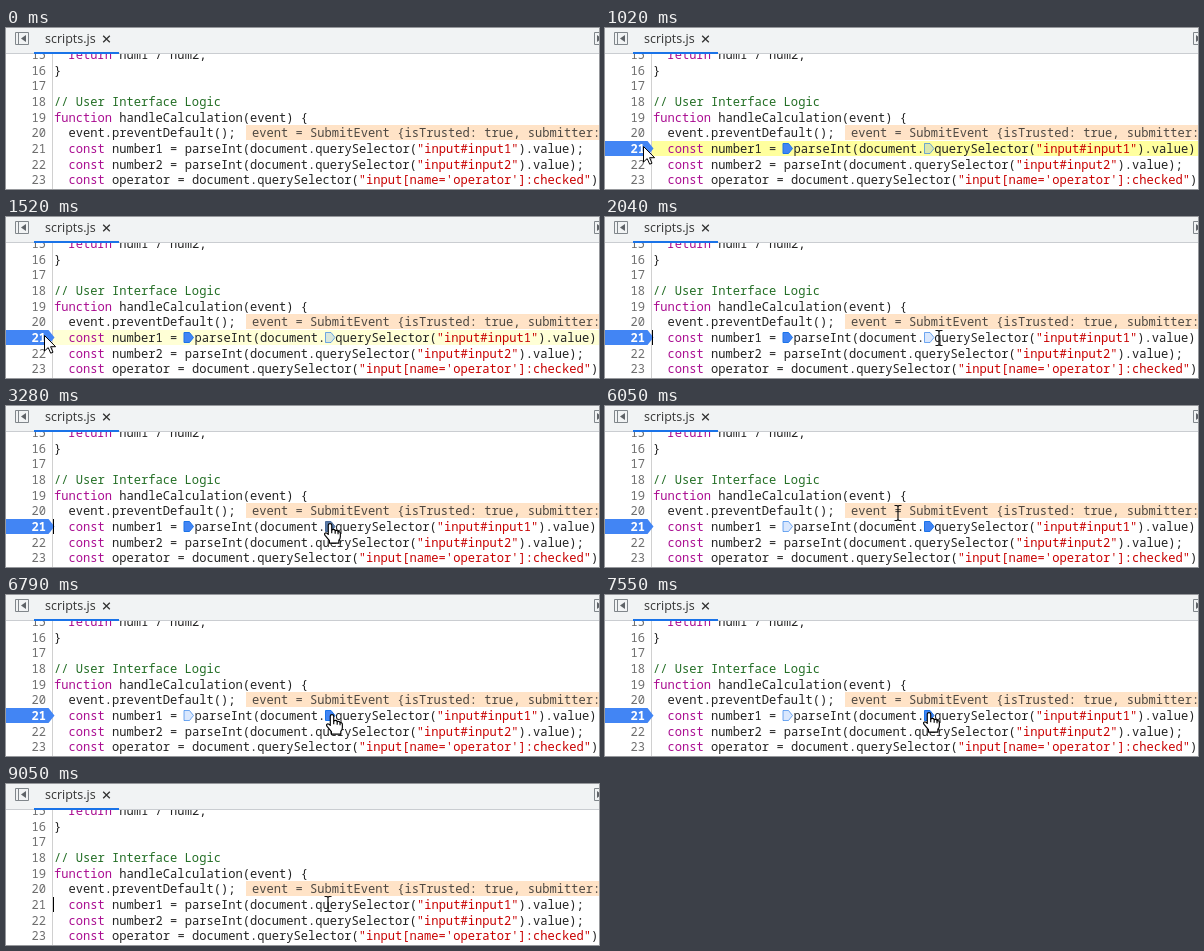
Write an HTML page that moves like this. It is 593 px wide and 161 px high and loops after 9.3 s.

```html
<!DOCTYPE html>
<html lang="en">
<head>
<meta charset="utf-8">
<title>Column breakpoints</title>
<style>
  html, body { margin: 0; width: 100%; height: 100%; overflow: hidden; background: #fff; }
  svg { display: block; width: 593px; height: 161px; }
  text { white-space: pre; }
  .code text { font: 12.1px "Noto Sans Mono", "DejaVu Sans Mono", monospace; fill: #222; }
  .code .keyword { fill: #aa0d91; }
  .code .string { fill: #c80000; }
  .code .comment { fill: #236e25; }
  .code .num { fill: #6e6e6e; text-anchor: end; }
  .code .num.on { fill: #fff; font-weight: 600; }
  .code .value { fill: #4d4842; }
  .tab { font: 12.5px "Open Sans", "Noto Sans", sans-serif; fill: #333; }
  .mark { stroke: #1a73e8; fill: #4285f4; }
  .mark.light { fill: #4285f433; stroke: #1a73e899; }
  .mark.hover { fill: #5b7ba8; stroke: #4a6a98; }
  .icon { fill: none; stroke: #80868b; }
  .icon .solid { fill: #5f6368; stroke: none; }
  .hand, .arrow { fill: #fff; stroke: #000; stroke-linejoin: round; }
  .off { display: none; }
</style>
</head>
<body>
<svg viewBox="0 0 593 161">
  <rect width="593" height="161" fill="#fff"/>
  <rect x="46" width="1" height="161" fill="#d0d0d0"/>
  <rect id="flash" x="47" y="113" width="546" height="15"/>
  <rect x="240" y="97" width="353" height="15" fill="#ffe3c7"/>
  <path id="gutter" d="M0 113H42.5L48.5 120.5L42.5 128H0Z" fill="#4285f4"/>
  <g class="code" id="code"></g>
  <path class="mark" id="m1"/>
  <path class="mark" id="m2"/>
  <rect id="caret" x="47" y="113" width="1" height="15" fill="#000"/>

  <rect width="593" height="25" fill="#f1f3f4"/>
  <rect y="25" width="593" height="1" fill="#cacdd1"/>
  <rect x="28" y="24" width="85" height="2" fill="#1a73e8"/>
  <g class="icon">
    <path d="M9.5 4.5H22.5V16.5H9.5ZM12.5 4.5V16.5"/>
    <path class="solid" d="M20 7V14L15 10.5Z"/>
    <path d="M600 4.5H588.5V16.5H600"/>
    <path class="solid" d="M591 7V14L596 10.5Z"/>
  </g>
  <text class="tab" x="39" y="15">scripts.js</text>
  <path d="M97.2 7.7L103.8 14.3M103.8 7.7L97.2 14.3" stroke="#333" stroke-width="1.3"/>

  <g id="pointer">
    <path class="arrow" id="arrow" d="M.5 .5V16L4.2 12.6L6.7 18.2L9 17.2L6.6 11.7H11.6Z"/>
    <path id="beam" d="M-3.5 -7.5H-1L0 -6.5L1 -7.5H3.5M0 -6.5V6.5M-3.5 7.5H-1L0 6.5L1 7.5H3.5" fill="none" stroke="#111" stroke-width="1.2"/>
    <g class="hand" id="hand" transform="scale(1.15)">
      <path d="M-1.5 10V1.8Q-1.5 .5 0 .5T1.5 1.8V6Q3.8 5 4.5 6.6Q6.6 6 7 7.6Q9 7.2 9 9V12Q9 14 7.7 15V17.5H-.5V15.4L-4.3 10.8Q-5.3 9.2 -4 8.7Q-2.8 8.4 -1.5 10Z"/>
      <path d="M1.5 6V9M4.5 6.6V9.4M7 7.6V9.8" fill="none"/>
    </g>
  </g>
</svg>
<script>
const LOOP = 9300, COL = 7.26, LEFT = 48, PITCH = 15.7, GAP = 9.9;
const SVG = "http://www.w3.org/2000/svg";
const TOKENS = /(\/\/.*|".*?"|\b(?:const|function|return)\b)/;
const $ = id => document.getElementById(id);
const colX = n => LEFT + n * COL;
const rowY = line => 125 + (line - 21) * PITCH;

function tokenClass(part) {
  if (part.startsWith("//")) return "comment";
  return part.startsWith('"') ? "string" : "keyword";
}

function addText(str, x, y, cls = "") {
  const el = document.createElementNS(SVG, "text");
  el.setAttribute("x", x);
  el.setAttribute("y", y);
  el.setAttribute("class", cls);
  String(str).split(TOKENS).forEach((part, i) => {
    const span = document.createElementNS(SVG, "tspan");
    span.textContent = part;
    if (i % 2) span.setAttribute("class", tokenClass(part));
    el.append(span);
  });
  $("code").append(el);
  return el;
}

const lines = [
  [2, "return num1 / num2;"],
  [0, "}"],
  [0, ""],
  [0, "// User Interface Logic"],
  [0, "function handleCalculation(event) {"],
  [2, "event.preventDefault();"],
  [2, "const number1 = "],
  [2, 'const number2 = parseInt(document.querySelector("input#input2").value);'],
  [2, "const operator = document.querySelector(\"input[name='operator']:checked\")"]
];
let lineNo;
lines.forEach(([indent, str], i) => {
  const y = rowY(15 + i), num = addText(15 + i, 40, y, "num");
  if (i === 6) lineNo = num;
  addText(str, colX(indent), y);
});
addText("event = SubmitEvent {isTrusted: true, submitter:", 246, rowY(20), "value");
const call = addText("parseInt(document.", colX(18), rowY(21));
const query = addText('querySelector("input#input1").value);', colX(36), rowY(21));

const tag = x => `M${x} 115.5H${x + 5.5}L${x + 9.5} 120.5L${x + 5.5} 125.5H${x}Z`;
$("m1").setAttribute("d", tag(178));
$("m2").setAttribute("d", tag(319.5));

// Each track lists [start ms, value...]; a value holds until the next start.
const pointer = [
  [0, ""], [250, "arrow", 38, 118], [1770, "arrow", 43, 118],
  [2040, "beam", 334, 121], [2290, "beam", 331, 115],
  [2540, "hand", 326, 119], [2780, "hand", 324, 117],
  [4050, "beam", 300, 128], [4300, "beam", 250, 131], [4550, "beam", 205, 126],
  [4800, "hand", 181, 119], [5050, "hand", 182, 117],
  [6050, "beam", 293, 107], [6290, "beam", 308, 110], [6540, "beam", 322, 114],
  [6790, "hand", 326, 119], [7040, "hand", 324, 117],
  [8320, "beam", 322, 120]
];
const gutter = [[0, 0], [250, 0.35], [770, 1], [8320, 0]];
const first = [[0, "off"], [770, ""], [5300, "light"], [8320, "off"]];
const second = [[0, "off"], [770, "light"], [3280, "hover"], [3800, ""], [8040, "light"], [8320, "off"]];
const flash = [[0, 0], [770, 0.65], [1020, 0.52], [1280, 0.38], [1520, 0.22], [1770, 0.1], [2040, 0]];
const blinks = [2040, 2540, 3280, 3800, 4300, 4800, 5300, 6050, 6290, 6790, 7290, 7550, 8320, 8780, 9050];

const at = (track, t) => track.findLast(step => step[0] <= t).slice(1);

function draw(t) {
  const [kind, x = 0, y = 0] = at(pointer, t);
  for (const id of ["arrow", "beam", "hand"]) $(id).classList.toggle("off", id !== kind);
  $("pointer").setAttribute("transform", `translate(${x} ${y})`);

  const [level] = at(gutter, t);
  $("gutter").setAttribute("opacity", level);
  lineNo.setAttribute("class", level === 1 ? "num on" : "num");

  $("m1").setAttribute("class", "mark " + at(first, t)[0]);
  $("m2").setAttribute("class", "mark " + at(second, t)[0]);
  const gap = level === 1 ? GAP : 0;
  call.setAttribute("x", colX(18) + gap);
  query.setAttribute("x", colX(36) + 2 * gap);

  $("flash").setAttribute("fill", `rgba(255, 255, 70, ${at(flash, t)[0]})`);
  const caretOn = blinks.filter(b => b <= t).length % 2;
  $("caret").setAttribute("opacity", caretOn);
}

const start = performance.now();
function tick() {
  draw((performance.now() - start) % LOOP);
  requestAnimationFrame(tick);
}
tick();
</script>
</body>
</html>
```
